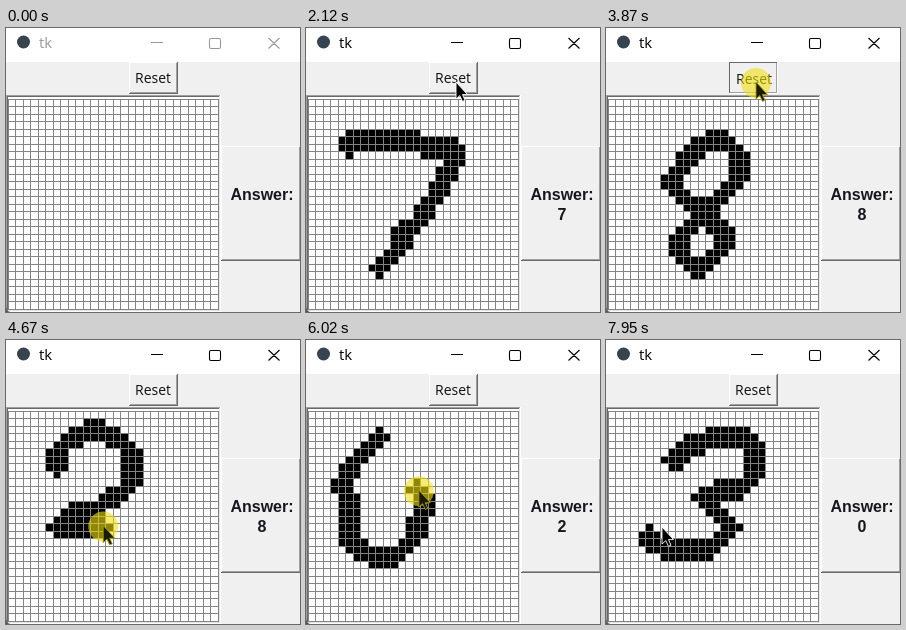
Write an HTML page that moves like this. It is 294 px wide and 284 px high and loops after 7990 ms.

```html
<!DOCTYPE html>
<html lang="en">
<head>
<meta charset="utf-8">
<title>tk</title>
<style>
  html, body { margin: 0; width: 100%; height: 100%; overflow: hidden; background: #f0f0f0; }
  svg { display: block; width: 100vw; height: 100vh; }
  .ui { font-family: "Open Sans", "Noto Sans", sans-serif; }
  .answer { font: bold 16px "Liberation Sans", Arial, sans-serif; fill: #17171f; text-anchor: middle; }
  .crisp { shape-rendering: crispEdges; }
</style>
</head>
<body>
<svg viewBox="0 0 294 284">
  <rect width="294" height="284" fill="#f0f0f0"/>
  <rect width="294" height="34" fill="#fff"/>
  <circle cx="17.5" cy="14" r="6.5" fill="#37434f"/>
  <text id="title" class="ui" x="33" y="20" font-size="15">tk</text>
  <path id="controls" d="M145 14.5h12M205 10.5h8q1.500 0 1.500 1.500v7q0 1.500-1.500 1.500h-8q-1.500 0-1.500-1.500v-7q0-1.500 1.500-1.500zM262.500 10l11 10.500M273.500 10l-11 10.500" fill="none" stroke-width="1.100"/>

  <g id="reset" class="crisp"></g>
  <text id="resetText" class="ui" x="147" y="55" font-size="14" text-anchor="middle" fill="#111">Reset</text>

  <g class="crisp">
    <rect y="67" width="215" height="217" fill="#fff"/>
    <path d="M0 67.500H214M.5 67V284" stroke="#a0a0a0"/>
    <path d="M1 68.500H213M1.500 68V283" stroke="#696969"/>
    <path d="M1 282.500H213.500V68" fill="none" stroke="#e3e3e3"/>
    <path id="ink"/>
    <path id="grid" stroke="#848484"/>
  </g>
  <path d="M0 279v5h5q-4 0-5-5z" fill="#555"/>

  <g id="ask" class="crisp"></g>
  <g id="askText" class="answer">
    <text x="256" y="172">Answer:</text>
    <text id="digit" x="256" y="192"></text>
  </g>

  <g id="cursor">
    <circle id="halo" r="15" fill="#f0e010" fill-opacity=".6"/>
    <path id="arrow" d="M0-1V16L3.800 12.600 6.500 18.400 9 17.200 6.500 11.600H11.500Z" stroke-width=".9"/>
  </g>
</svg>
<script>
const LOOP = 7990, PITCH = 7.5, LEFT = 2, TOP = 71, SIZE = 28;
const $ = id => document.getElementById(id);

const keys = [], ink = [], holds = [], resets = [], answers = [];

function move(t, x, y) {
  keys.push({ t, x, y, ease: true });
}

// Walks the waypoints cell by cell; every visited cell takes a plus-shaped brush.
function draw(from, to, route) {
  const points = route.split(' ').map(p => p.split(',').map(Number));
  const steps = [points[0]];
  for (let i = 1; i < points.length; i++) {
    const [a, b] = points[i - 1], [c, d] = points[i];
    const n = Math.ceil(Math.max(Math.abs(c - a), Math.abs(d - b)));
    for (let k = 1; k <= n; k++) steps.push([a + (c - a) * k / n, b + (d - b) * k / n]);
  }
  steps.forEach(([c, r], i) => {
    const t = from + (to - from) * i / (steps.length - 1);
    keys.push({ t, x: LEFT + (c + .5) * PITCH, y: TOP + (r + .5) * PITCH, ease: i === 0 });
    ink.push({ t, c: Math.round(c), r: Math.round(r), round: resets.length });
  });
  holds.push({ from, to: to + 15 });
}

function press(t, x, y, button) {
  move(t - 30, x, y);
  move(t + 90, x, y);
  holds.push({ from: t, to: t + 80, button });
}

function ask(t, digit) {
  press(t, 246, 200, 'ask');
  answers.push({ t: t + 80, digit });
}

function reset(t) {
  press(t, 150, 55, 'reset');
  resets.push(t + 60);
}

move(140, -25, 190);
draw(380, 880, '5,6 5,5 14,5 15,6 19,6');
draw(880, 1155, '19,6 19,8 18,9 18,10 17,11 17,12 15,14 15,15 13,17 12,17 12,19 10.6,20.1');
draw(1155, 1270, '10.6,20.1 10,21 9,22');
ask(1610, '7');
reset(2130);

draw(2500, 2885, '12,14 13,14 17,10 17,7 15,5 13,5 12,6 11,6 10,7 10,8 8,10 8,11 11.63,14.43');
draw(2885, 3220, '11.63,14.43 15,17 15,19 12,22 11,22 9,20 9,18 12,15');
move(3310, 185, 195);
ask(3480, '8');
reset(3840);

draw(4140, 4665, '6,7 6,5 8,3 9,3 10,2 12,2 13,3 14,3 16,5 16,9 14,11 13,11 12,12 10,13 8,13 6,15 11.9,14.9');
draw(4665, 4790, '11.9,14.9 15,15 19,16');
move(4910, 192, 192);
ask(5060, '2');
reset(5420);

draw(5720, 6015, '9,3 5,7 5,8 4,9 4,10 5,11 5,17 7,18 9,19 11,19 14,16 14,14 15,13 15,12 14.3,10.3');
draw(6015, 6330, '14.3,10.3 14,9 14,7 11,4 10,4 9,3');
move(6560, 82, 106);
ask(6790, '0');
move(7130, 155, 65);
reset(7195);

draw(7395, 7890, '8,6 9,6 9,5 10,4 12,4 13,3 18,3 19,4 19,8 17,10 14,10 12,11 13,12 16,15 13,18 7,18 6,17 5,17 5,16');
move(7940, 56, 188);
move(LOOP, 56, 188);

let gridPath = '';
for (let i = 0; i <= SIZE; i++) {
  const d = Math.floor(i * PITCH) + .5;
  gridPath += `M${LEFT + d} ${TOP}v210M${LEFT} ${TOP + d}h211`;
}
$('grid').setAttribute('d', gridPath);

function bevel(id, x, y, w, h, down) {
  const [light, dark] = down ? ['#696969', '#fff'] : ['#fff', '#696969'];
  $(id).innerHTML = `<rect x="${x}" y="${y}" width="${w}" height="${h}" fill="#f0f0f0"/>
    <path d="M${x + 1} ${y + h - 1.5}H${x + w - 1.5}V${y + 1}" fill="none" stroke="#a0a0a0"/>
    <path d="M${x} ${y + h - .5}H${x + w - .5}V${y}" fill="none" stroke="${dark}"/>
    <path d="M${x + .5} ${y + h - 1}V${y + .5}H${x + w - 1}" fill="none" stroke="${light}"/>`;
}

function pointer(t) {
  const i = keys.findIndex(k => k.t > t);
  if (i === 0) return keys[0];
  if (i < 0) return keys[keys.length - 1];
  const a = keys[i - 1], b = keys[i];
  let p = (t - a.t) / (b.t - a.t);
  if (b.ease) p = p * p * (3 - 2 * p);
  return { x: a.x + (b.x - a.x) * p, y: a.y + (b.y - a.y) * p };
}

function inkPath(t) {
  const round = resets.filter(r => r <= t).length;
  const cells = new Set();
  for (const { t: at, c, r, round: own } of ink) {
    if (own !== round || at > t) continue;
    for (const [dx, dy] of [[0, 0], [1, 0], [-1, 0], [0, 1], [0, -1]]) cells.add(`${c + dx},${r + dy}`);
  }
  return [...cells].map(cell => {
    const [c, r] = cell.split(',');
    return `M${LEFT + c * PITCH} ${TOP + r * PITCH}h${PITCH}v${PITCH}h-${PITCH}z`;
  }).join('');
}

function render(t) {
  const tone = t < holds[0].from ? '#999' : '#000';
  $('title').setAttribute('fill', tone);
  $('controls').setAttribute('stroke', tone);

  $('ink').setAttribute('d', inkPath(t));

  const hold = holds.find(h => t >= h.from && t < h.to);
  for (const [id, x, y, w, h] of [['reset', 123, 34, 49, 32], ['ask', 215, 118, 80, 115]]) {
    const down = Boolean(hold && hold.button === id);
    bevel(id, x, y, w, h, down);
    $(id + 'Text').setAttribute('transform', down ? 'translate(1 1)' : '');
  }

  const said = answers.filter(a => a.t <= t).pop();
  $('digit').textContent = said ? said.digit : '';

  const { x, y } = pointer(t);
  $('cursor').setAttribute('transform', `translate(${x.toFixed(2)} ${y.toFixed(2)})`);
  $('halo').setAttribute('visibility', hold ? 'visible' : 'hidden');
  $('arrow').setAttribute('fill', hold ? '#1c1a00' : '#000');
  $('arrow').setAttribute('stroke', hold ? '#a89c10' : '#fff');
}

function tick() {
  render(performance.now() % LOOP);
  requestAnimationFrame(tick);
}
render(0);
requestAnimationFrame(tick);
</script>
</body>
</html>
```
